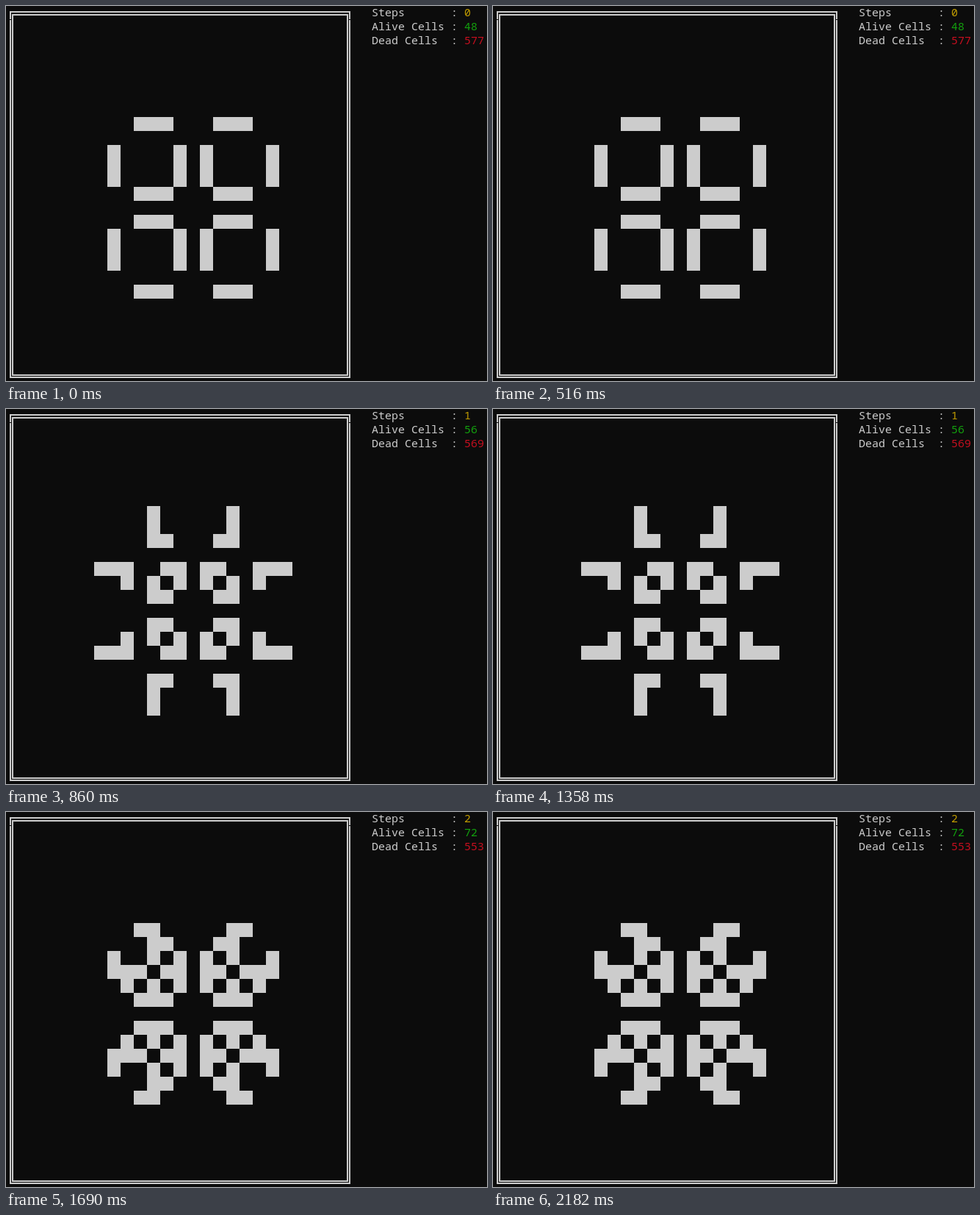
An HTML page with a canvas that plays this animation: 655 by 510 pixels, repeating every 2.51 s.

```html
<!DOCTYPE html>
<html lang="en">
<head>
<meta charset="utf-8">
<title>Game of Life</title>
<style>
  html, body { margin: 0; width: 655px; height: 510px; overflow: hidden; background: #0c0c0c; }
  canvas { display: block; }
</style>
</head>
<body>
<canvas id="stage" width="655" height="510"></canvas>
<script>
const ctx = document.getElementById('stage').getContext('2d');
const SIZE = 25, CELL_W = 18, CELL_H = 19, LEFT = 12, TOP = 18, CENTER = 13;
const LOOP = 2510, STEP_TIMES = [0, 860, 1690];
const BG = '#0c0c0c', FG = '#cccccc';

// Pulsar: four-fold mirrored bars around the center
function pulsar() {
  const grid = new Uint8Array(SIZE * SIZE);
  const set = (x, y) => { grid[(CENTER + y) * SIZE + CENTER + x] = 1; };
  for (const a of [-6, -1, 1, 6])
    for (const b of [-4, -3, -2, 2, 3, 4]) {
      set(a, b);
      set(b, a);
    }
  return grid;
}

function evolve(grid) {
  const alive = (x, y) => x >= 0 && y >= 0 && x < SIZE && y < SIZE ? grid[y * SIZE + x] : 0;
  return grid.map((cell, i) => {
    const x = i % SIZE, y = Math.floor(i / SIZE);
    let sum = -cell;
    for (let dy = -1; dy <= 1; dy++)
      for (let dx = -1; dx <= 1; dx++) sum += alive(x + dx, y + dy);
    return sum === 3 || (cell && sum === 2) ? 1 : 0;
  });
}

const generations = [pulsar()];
while (generations.length < STEP_TIMES.length) generations.push(evolve(generations.at(-1)));

function rect(color, x, y, w, h) {
  ctx.fillStyle = color;
  ctx.fillRect(x, y, w, h);
}

function frame(x, y, right, bottom) {
  rect(FG, x, y, right - x, bottom - y);
  rect(BG, x + 2, y + 2, right - x - 4, bottom - y - 4);
}

function stat(row, label, value, color) {
  const y = 14 + row * CELL_H;
  ctx.fillStyle = FG;
  ctx.fillText(label.padEnd(12) + ':', 498, y);
  ctx.fillStyle = color;
  ctx.fillText(value, 624, y);
}

function draw(step) {
  const grid = generations[step];
  const alive = grid.reduce((sum, cell) => sum + cell, 0);
  rect(BG, 0, 0, 655, 510);
  frame(5, 7, 469, 506);
  frame(8, 11, 466, 503);
  // Seam between the corner glyphs and the side lines
  rect(BG, 5, 18, 2, 1);
  rect(BG, 467, 18, 2, 1);
  grid.forEach((cell, i) => {
    if (cell) rect(FG, LEFT + i % SIZE * CELL_W, TOP + Math.floor(i / SIZE) * CELL_H, CELL_W, CELL_H);
  });
  ctx.font = '500 15px "Noto Sans Mono", monospace';
  stat(0, 'Steps', step, '#c19c00');
  stat(1, 'Alive Cells', alive, '#13a10e');
  stat(2, 'Dead Cells', grid.length - alive, '#c50f1f');
}

const start = performance.now();
function tick() {
  const t = (performance.now() - start) % LOOP;
  draw(STEP_TIMES.findLastIndex(time => t >= time));
  requestAnimationFrame(tick);
}
tick();
</script>
</body>
</html>
```
